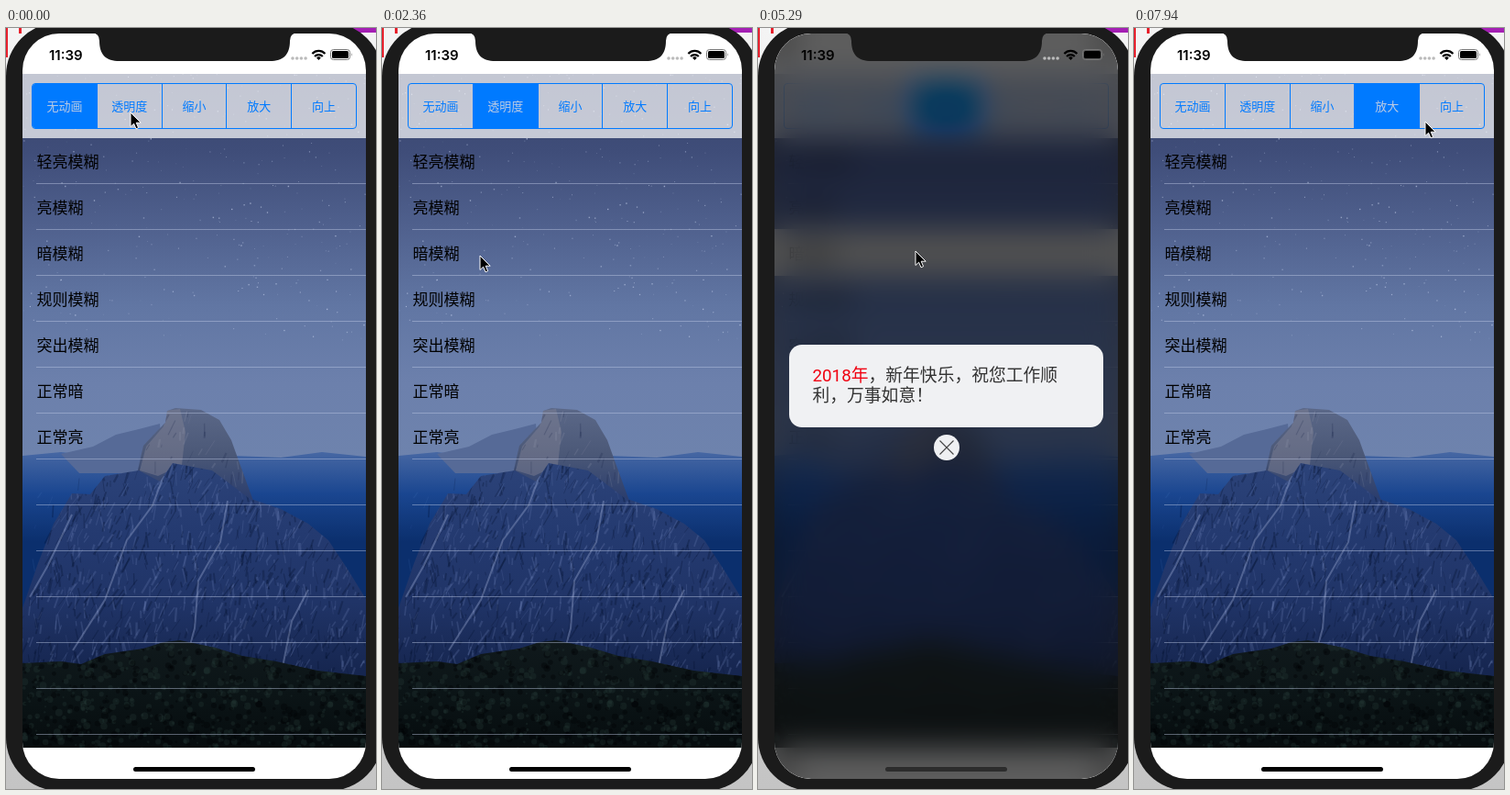
Recreate the animation shown at these times as an HTML page with a canvas. Size 404 by 829 pixels, loop 8000 ms.

```html
<!DOCTYPE html>
<html lang="zh">
<head>
<meta charset="utf-8">
<style>
html, body { margin: 0; width: 100%; height: 100%; overflow: hidden; }
body { position: relative; background: linear-gradient(#f4f4f4, #d8d8d8 60%, #c4c4c4); font-family: "Noto Sans CJK SC", "Noto Sans CJK", sans-serif; }
div, svg, canvas { position: absolute; box-sizing: border-box; }
.phone { left: 0; top: -6px; width: 411px; height: 837px; border-radius: 58px; background: #1b1b1b; }
.screen { left: 18px; top: 6px; width: 375px; height: 812px; border-radius: 40px; overflow: hidden; background: #fff; }
#photo { left: 0; top: 44px; }
.header { top: 44px; width: 375px; height: 70px; background: rgba(255,255,255,.7); }
#tabs { left: 10px; top: 54px; width: 355px; height: 50px; border: 1px solid #007aff; border-radius: 4px; display: flex; overflow: hidden; }
#tabs span { flex: 1; font-size: 13px; line-height: 48px; text-align: center; color: #007aff; }
#tabs span + span { border-left: 1px solid #007aff; }
#tabs .on { background: #007aff; color: #bccbe4; }
.row { left: 0; width: 375px; height: 51px; padding-left: 15.5px; font-size: 17px; line-height: 51px; color: #000; }
.row::after { content: ""; position: absolute; left: 15px; right: 0; bottom: 0; height: 1px; background: rgba(190,203,228,.45); }
.row.on { background: #d9d9d9; }
.row.on::after { display: none; }
#veil { inset: 0; }
#popup { inset: 0; }
.card { left: 16px; top: 339px; width: 343px; height: 90px; padding: 23px 0 0 25.5px; border-radius: 14px; background: #f0f1f3; color: #333; font: 18.8px/22px Roboto, "Noto Sans CJK SC", "Noto Sans CJK", sans-serif; white-space: nowrap; }
.card b { font-weight: 400; color: #f00010; }
#popup svg { left: 173.5px; top: 437px; }
#overlay { left: 0; top: 0; }
</style>
</head>
<body>
<svg width="404" height="60">
  <path d="M0 0H2V32H0zM14 0h3v6h-3z" fill="#e8202c"/>
  <path d="M378 0h26v5h-26z" fill="#a41fb4"/>
</svg>
<div class="phone"></div>
<div class="screen">
  <canvas id="photo" width="375" height="734"></canvas>
  <div class="header"></div>
  <div id="tabs"></div>
  <div id="rows"></div>
  <div id="veil"></div>
  <div id="popup">
    <div class="card"><b>2018年</b>，新年快乐，祝您工作顺<br>利，万事如意！</div>
    <svg width="28" height="28"><circle cx="14" cy="14" r="14" fill="#eff0f2"/><path d="M6.5 6.5l15 15m0-15l-15 15" stroke="#444" stroke-width="1.1"/></svg>
  </div>
</div>
<svg id="overlay" width="404" height="829">
  <path d="M94 5Q102 6 102 14C102 29 109 36 124 36H288C303 36 310 29 310 14Q310 6 318 5z" fill="#1b1b1b"/>
  <text x="47" y="34.5" font-family="Inter, sans-serif" font-size="15" font-weight="600">11:39</text>
  <g fill="#bbb"><circle cx="313" cy="33" r="1.8"/><circle cx="317.7" cy="33" r="1.8"/><circle cx="322.4" cy="33" r="1.8"/><circle cx="327.1" cy="33" r="1.8"/></g>
  <g fill="none" stroke="#000" stroke-width="2.2"><path d="M334.4 28a9.6 9.6 0 0 1 14 0M337 31a6.2 6.2 0 0 1 8.8 0"/></g>
  <path d="M341.4 35l-2.4-2.5a3.4 3.4 0 0 1 4.8 0z"/>
  <rect x="354.5" y="23.5" width="21" height="11" rx="3" fill="none" stroke="#777"/>
  <rect x="356" y="25" width="18" height="8" rx="1.6"/>
  <path d="M377 27q1.6 2 0 4z" fill="#777"/>
  <rect id="home" x="139" y="805" width="133" height="5" rx="2.5"/>
  <path id="cursor" d="M0 0V15.5l3.6-3.3 2.4 5.6 2.6-1.1-2.4-5.5h5z" stroke="#fff"/>
</svg>
<script>
const $ = id => document.getElementById(id);
const LOOP = 8000, STEP = 147, FADE = 300;

const addAll = (parent, tag, names, setup) => names.map((name, i) => {
  const el = parent.appendChild(document.createElement(tag));
  el.textContent = name;
  if (setup) setup(el, i);
  return el;
});
const tabs = addAll($("tabs"), "span", ["无动画", "透明度", "缩小", "放大", "向上"]);
const rowNames = ["轻亮模糊", "亮模糊", "暗模糊", "规则模糊", "突出模糊", "正常暗", "正常亮", "", "", "", "", "", ""];
const rows = addAll($("rows"), "div", rowNames, (el, i) => {
  el.className = "row";
  el.style.top = 113 + 50 * i + "px";
});

// Night landscape, in stage coordinates
function paintPhoto() {
  const c = $("photo").getContext("2d");
  let seed = 7;
  const rnd = (a = 0, b = 1) => {
    seed = (seed * 16807) % 2147483647;
    return a + (b - a) * seed / 2147483647;
  };
  const grad = (y0, y1, ...colors) => {
    const g = c.createLinearGradient(0, y0, 0, y1);
    colors.forEach((color, i) => g.addColorStop(i / (colors.length - 1), color));
    return g;
  };
  const shape = (fill, points) => {
    const p = new Path2D("M" + points);
    c.fillStyle = fill;
    c.fill(p);
    return p;
  };
  const streaks = (n, y0, y1, light, dark) => {
    for (let i = 0; i < n; i++) {
      const x = rnd(18, 393), y = rnd(y0, y1), len = rnd(3, 17);
      c.strokeStyle = rnd() < .5 ? light : dark;
      c.lineWidth = rnd(.5, 2.4);
      c.beginPath();
      c.moveTo(x, y);
      c.lineTo(x - len * rnd(-.3, .8), y + len);
      c.stroke();
    }
  };
  const within = (path, draw) => { c.save(); c.clip(path); draw(); c.restore(); };

  c.translate(-18, -50);
  c.fillStyle = grad(50, 470, "#37436c", "#3f4d79", "#50618e", "#6176a3", "#6c80ac", "#6e83ad");
  c.fillRect(18, 50, 375, 430);
  for (let i = 0; i < 330; i++) {
    const size = rnd(.5, 1.5);
    c.fillStyle = `rgba(215,225,250,${rnd(.12, .6)})`;
    c.fillRect(rnd(18, 393), 50 + 290 * rnd() ** 1.3, size, size);
  }
  shape(grad(455, 560, "#4d6ca6", "#1a4690", "#0b2f6d"),
    "18 466 60 462 95 466 145 470 250 466 300 468 345 462 393 467V710H18z");
  shape("#566a97", "60 464L95 456 120 443 145 437 168 431 172 485H80z");
  const dome = shape(grad(414, 515, "#5b6888", "#4b5877", "#293c6d"),
    "142 490L150 455 166 438 174 430 176 417 185 414 213 416 233 427 246 449 255 474 270 515H150z");
  within(dome, () => {
    shape("rgba(132,132,148,.45)", "174 417L190 415 196 440 192 476 166 488 146 482 153 456 172 434z");
    streaks(150, 414, 500, "rgba(150,155,175,.2)", "rgba(30,40,75,.25)");
  });
  const massif = shape(grad(475, 700, "#2c4379", "#243a70", "#203467", "#162650"),
    "18 632L35 583 52 540 72 507 92 508 108 488 145 482 168 494 182 474 225 482 265 512 300 524 330 540 352 558 372 588 393 622V720H18z");
  within(massif, () => {
    streaks(1300, 470, 700, "rgba(125,145,200,.2)", "rgba(6,17,48,.3)");
    c.strokeStyle = "rgba(165,180,220,.35)";
    c.lineWidth = 2;
    for (const d of ["M172 488l-12 32-28 38-24 65-35 55", "M242 515l-8 45-24 42-4 52-10 36", "M330 612l-18 34-10 50", "M72 530l-26 55-20 35"]) c.stroke(new Path2D(d));
  });
  within(new Path2D("M18 485H60L110 488 72 507 35 583 18 632z"), () =>
    streaks(110, 480, 630, "rgba(70,110,180,.18)", "rgba(3,20,60,.35)"));
  const forest = shape(grad(668, 784, "#10191c", "#0b1416", "#060c0e"),
    "18 692L60 690 82 693 108 682 150 676 172 669 190 667 228 675 258 684 295 690 340 700 393 706V784H18z");
  within(forest, () => {
    for (let i = 0; i < 900; i++) {
      c.fillStyle = rnd() < .5 ? "rgba(40,62,58,.28)" : "rgba(0,3,5,.4)";
      c.beginPath();
      c.arc(rnd(18, 393), rnd(668, 784), rnd(1, 4), 0, 7);
      c.fill();
    }
  });
}
paintPhoto();

const ease = u => { u = Math.min(1, Math.max(0, u)); return u * u * (3 - 2 * u); };

const veils = {
  extraLight: "rgba(255,255,255,.72)",
  dark: "rgba(17,17,17,.68)",
  regular: "rgba(255,255,255,.3)"
};
// `from` is the scale at which the popup enters
const shows = [
  { start: 1330, end: 1980, row: 0, veil: "extraLight", from: 1 },
  { start: 2510, end: 3590, row: 2, veil: "dark", from: 1 },
  { start: 4990, end: 5680, row: 2, veil: "dark", from: 1.2 },
  { start: 6885, end: 7420, row: 3, veil: "regular", from: .2 }
];
const tabTimes = [0, 140, 4020, 6320];
const cursorPath = [
  [0, 136, 92], [300, 136, 92], [1030, 147, 147], [1900, 147, 147], [2350, 107, 248],
  [3500, 107, 248], [3960, 204, 88], [4110, 204, 88], [4410, 208, 181], [4700, 172, 243],
  [5700, 172, 243], [6250, 274, 88], [6400, 274, 88], [6800, 190, 278], [7360, 190, 278], [7940, 318, 102]
];

function cursorAt(t) {
  const i = cursorPath.findIndex(key => key[0] > t);
  if (i < 0) return cursorPath.at(-1).slice(1);
  const [t0, x0, y0] = cursorPath[i - 1], [t1, x1, y1] = cursorPath[i];
  const p = ease((t - t0) / (t1 - t0));
  return [x0 + (x1 - x0) * p, y0 + (y1 - y0) * p];
}

function render(t) {
  const show = shows.find(s => t >= s.start - 10 && t < s.end + FADE);
  const entering = show ? ease((t - show.start) / FADE) : 0;
  const alpha = show ? entering * (1 - ease((t - show.end) / FADE)) : 0;
  const scale = show ? show.from + (1 - show.from) * (t < show.end ? entering : alpha) : 1;

  const tab = tabTimes.filter(start => start <= t).length - 1;
  tabs.forEach((el, i) => el.classList.toggle("on", i === tab));
  rows.forEach((el, i) => el.classList.toggle("on", !!show && t < show.end && i === show.row));

  const veil = $("veil").style, popup = $("popup").style;
  veil.display = popup.display = alpha > 0 ? "block" : "none";
  veil.opacity = popup.opacity = alpha;
  veil.backdropFilter = "blur(16px) saturate(1.6)";
  veil.background = show ? veils[show.veil] : "none";
  popup.transform = `scale(${scale})`;
  $("home").style.opacity = show && show.veil === "dark" ? 1 - alpha / 2 : 1;
  $("cursor").setAttribute("transform", `translate(${cursorAt(t)})`);
}

function tick() {
  const t = performance.now() % LOOP;
  render(Math.floor((t + 3) / STEP) * STEP);
  requestAnimationFrame(tick);
}
tick();
</script>
</body>
</html>
```
